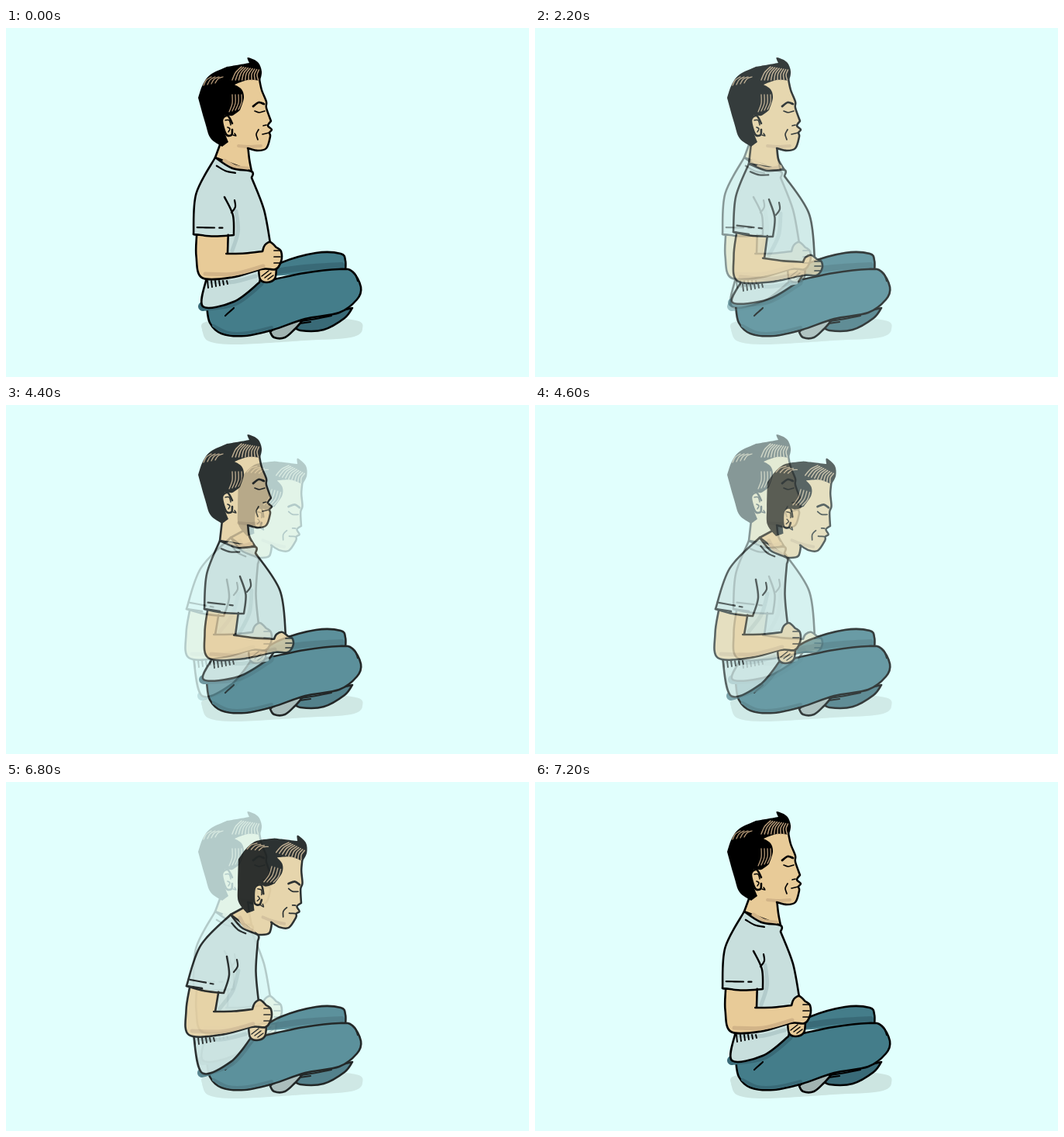
Write an HTML page that moves like this. It is 675 px wide and 450 px high and loops after 7300 ms.

```html
<!DOCTYPE html>
<html lang="en">
<head>
<meta charset="utf-8">
<title>Breathing posture</title>
<style>
html, body { margin: 0; width: 100%; height: 100%; overflow: hidden; background: #e1fffd; }
svg { display: block; width: 100%; height: 100%; }
path { stroke-linecap: round; stroke-linejoin: round; }
</style>
</head>
<body>
<svg id="stage" viewBox="0 0 675 450"></svg>
<script>
const SKIN = '#e8cb98', SKIN_SHADE = '#d2b488', STRAND = '#b79a78', SHIRT = '#c8dfdd', SHIRT_SHADE = '#b2cbcb',
  TEAL = '#447d8a', TEAL_SHADE = '#396a77', SOCK = '#a1b3b1', FLOOR = '#cce5e1', INK = '#000';

// Points: a shifted copy, a blend, and a midpoint pushed to the left of the way from a to b.
const shift = ([x, y], dx, dy) => [x + dx, y + dy];
const mix = (a, b, t) => a.map((v, k) => v + (b[k] - v) * t);
function via(a, b, bulge) {
  const dx = b[0] - a[0], dy = b[1] - a[1], k = bulge / Math.hypot(dx, dy);
  return shift(mix(a, b, .5), dy * k, -dx * k);
}
const arc = (a, b, bulge) => `${a} ${via(a, b, bulge)} ${b}`;
const repeat = (count, make) => Array.from({ length: count }, (_, i) => make(i)).join(';');

// Smooth curve through points; '|' keeps a corner, ';' starts a new line.
function trace(text) {
  return text.split(';').map(line => {
    let last, d = '';
    for (const part of line.split('|')) {
      const pts = part.trim().split(/\s+/).map(p => p.split(',').map(Number));
      if (last) pts.unshift(last); else d = 'M' + pts[0];
      for (let i = 0; i < pts.length - 1; i++) {
        const b = pts[i], c = pts[i + 1], a = pts[i - 1] || b, e = pts[i + 2] || c;
        const handle = (p, q, r, s) => p.map((v, k) => (v + s * (r[k] - q[k]) / 6).toFixed(1));
        d += `C${handle(b, a, c, 1)} ${handle(c, b, e, -1)} ${c}`;
      }
      last = pts[pts.length - 1];
    }
    return d;
  }).join('');
}
const draw = (fill, stroke, width, text) =>
  `<path d="${trace(text)}" fill="${fill}" stroke="${stroke}" stroke-width="${width}"/>`;
const flat = (color, text) => draw(color, 'none', 0, text);
const solid = (color, text) => draw(color, INK, 2.6, text);
const ink = (text, width = 2.2) => draw('none', INK, width, text);
const tint = (color, width, text) => draw('none', color, width, text);

const legs =
  flat(FLOOR, '253,390 262,378 350,374 446,376 460,388 445,399 385,403 300,408 262,404 253,390') +
  solid(TEAL, '324,321 354,303 400,290 432,291 438,300 438,314') +
  tint(TEAL_SHADE, 8, '342,315 385,309 433,306') +
  solid(TEAL_SHADE, '371,384 380,390 410,389 437,374 447,361|371,378') +
  solid(SOCK, '341,392 346,399 360,399 373,388 382,378|360,374 341,392') +
  solid(TEAL, '259,358 263,380 278,394 308,397 345,389 386,375 430,367 453,350 458,334 447,314 430,311 385,316 328,328|285,350') +
  tint(TEAL_SHADE, 4, '268,384 287,393 312,393 343,386') +
  ink('447,314 451,318 454,326;380,378 400,375 420,371;379,381 393,379;283,371 294,361');

const head =
  flat(SKIN, '300,66 327,66|330,80 336,95 336,103 342,120|338,126 343,131 340,135 341,140 336,155 325,158 310,154|284,147 280,90 300,66') +
  tint(SKIN_SHADE, 4, '300,152 314,153 329,152') +
  ink('327,66 330,80 336,95 336,103 342,120|338,126 343,131 340,135 341,140 336,155 325,158 312,155', 2.5) +
  flat(INK, '279,153 264,142 257,122 248,90|254,73 264,60 285,50|297,48 314,45|312,38 325,44 330,56 328,68|312,67 295,73|304,79 307,90 302,106|292,113 282,113 281,130 287,147|279,153') +
  solid(SKIN, '292,123 286,113 279,119 284,137 291,138 292,131') +
  ink('283,119 288,119 290,125;286,128 289,130 287,134;293,138 297,139 295,136', 1.5) +
  tint(STRAND, 1.5, repeat(9, i => arc([292 + 4.2 * i, 67], [304 + 2.8 * i, 50 + i * .5], 2))) +
  tint(STRAND, 1.3, repeat(4, i => arc([255 + 5 * i, 74 - i], [265 + 5 * i, 63], 2))) +
  tint(STRAND, 1.3, repeat(4, i => arc([288 + 4 * i, 108 - i], [292 + 4 * i, 86], -2))) +
  ink('319,101 326,96 333,98', 2.8) +
  ink('321,107 327,109 334,107;332,126 336,125;331,137 340,135;326,131 323,137 325,144', 1.7);

const NOSE = [342, 120];

function figure(p) {
  const { nape, throat, armpit, cuffBack, cuffFront, elbow, crook, fist, belly, hemBack, hemFront } = p;
  const turn = p.tilt * Math.PI / 180;
  const onHead = (x, y) => {
    const dx = x - NOSE[0], dy = y - NOSE[1], c = Math.cos(turn), s = Math.sin(turn);
    return shift(p.nose, dx * c - dy * s, dx * s + dy * c);
  };
  const hand = (x, y) => shift(fist, x, y * p.grip);
  const cuff = arc(cuffBack, cuffFront, -2), collar = arc(throat, nape, 5);
  const hem = arc(hemBack, hemFront, -10);
  const wrist = hand(-13, 16), chest = shift(throat, 0, 8);
  const armFront = mix(cuffBack, cuffFront, .86);
  const stitch = t => shift(mix(cuffBack, cuffFront, t), 0, -9);
  const rib = t => shift(mix(nape, throat, t), 0, 10);

  const neck =
    solid(SKIN, `${onHead(280, 140)} ${nape}|${throat}|${onHead(314, 169)} ${onHead(312, 150)}`) +
    tint(SKIN_SHADE, 5, arc(shift(throat, -6, -4), shift(nape, 12, 4), 3));

  const shirt =
    tint(TEAL_SHADE, 12, hem) +
    solid(SHIRT, `${arc(nape, cuffBack, -p.back)}|${shift(cuffBack, 20, 3)}|${shift(elbow, 6, 0)}|${hem}|${belly}|${via(belly, chest, -p.front)} ${chest}|${collar}`) +
    tint(SHIRT_SHADE, 5, arc(shift(armpit, 15, 18), shift(crook, 6, -4), 5)) +
    tint(SHIRT_SHADE, 5, arc(shift(elbow, 10, 5), shift(wrist, -8, 9), -4)) +
    ink(repeat(6, i => `${shift(elbow, 7 + 5 * i, 4)} ${shift(elbow, 8 + 5 * i, 13 - i)}`), 1.9);

  const backHand = p.clasped ?
    solid(SKIN, `${hand(-17, 15)} ${hand(-15, 29)} ${hand(-6, 33)} ${hand(4, 28)} ${hand(6, 14)}`) +
    ink(repeat(3, i => `${hand(-13 + 4 * i, 25 + 2 * i)} ${hand(-4 + 3 * i, 18 + 3 * i)}`), 1.5) : '';

  const arm =
    solid(SKIN, `${armFront} ${crook}|${arc(crook, hand(-12, -7), -1)}|${hand(-9, -15)} ${hand(-2, -19)} ${hand(6, -12)}|${hand(12, -7)} ${hand(12, 6)} ${hand(5, 16)} ${arc(wrist, elbow, 5)} ${via(elbow, cuffBack, 2)} ${shift(cuffBack, 4, 2)}`) +
    tint(SKIN_SHADE, 5, arc(shift(elbow, 4, -5), shift(wrist, 2, -4), -5)) +
    ink(repeat(3, i => `${hand(3, -8 + 8 * i)} ${hand(11, -8 + 8 * i)}`), 1.7);

  const sleeve =
    ink(`${cuff}|${via(cuffFront, armpit, -5)} ${armpit}`, 2.5) +
    ink(`${arc(shift(armpit, 13, 4), shift(armpit, 9, 20), 3)};${stitch(.09)} ${stitch(.52)};${stitch(.64)} ${stitch(.72)};${arc(rib(.04), rib(.55), -2)}`);

  const tilted = `<g transform="translate(${p.nose}) rotate(${p.tilt}) translate(${-NOSE[0]} ${-NOSE[1]})">${head}</g>`;
  return `<g>${legs + neck + tilted + shirt + backHand + arm + sleeve}</g>`;
}

const slouch = {
  nose: NOSE, tilt: 0, back: 11, front: 4, grip: 1, clasped: true,
  nape: [270, 167], throat: [317, 185], armpit: [282, 218], cuffBack: [242, 266], cuffFront: [294, 267],
  elbow: [253, 322], crook: [286, 291], fist: [343, 295], belly: [341, 277], hemBack: [254, 359], hemFront: [327, 328]
};
const tall = {
  nose: NOSE, tilt: 0, back: 7, front: 13, grip: .75, clasped: false,
  nape: [276, 175], throat: [322, 183], armpit: [302, 221], cuffBack: [256, 263], cuffFront: [307, 269],
  elbow: [261, 326], crook: [296, 297], fist: [358, 307], belly: [361, 297], hemBack: [255, 354], hemFront: [340, 327]
};
const bowed = {
  nose: [381, 156], tilt: 17, back: 12, front: -3, grip: 1, clasped: true,
  nape: [290, 171], throat: [325, 197], armpit: [285, 225], cuffBack: [233, 263], cuffFront: [281, 272],
  elbow: [236, 326], crook: [270, 296], fist: [330, 300], belly: [326, 283], hemBack: [253, 375], hemFront: [316, 330]
};

const stage = document.getElementById('stage');
stage.innerHTML = [slouch, tall, bowed].map(figure).join('');
const layers = [...stage.children];
const LOOP = 7300, STEP = 100, STEPS = 5, FADES = [2000, 4400, 6800];

function frame() {
  const time = performance.now() % LOOP;
  let alpha = [1, 0, 0];
  FADES.forEach((start, i) => {
    if (time < start) return;
    const p = Math.min(1, (Math.floor((time - start) / STEP) + 1) / STEPS);
    alpha = [0, 0, 0];
    alpha[i] = 1 - p;
    alpha[(i + 1) % 3] = p;
  });
  layers.forEach((layer, i) => layer.setAttribute('opacity', alpha[i]));
  requestAnimationFrame(frame);
}
frame();
</script>
</body>
</html>
```
